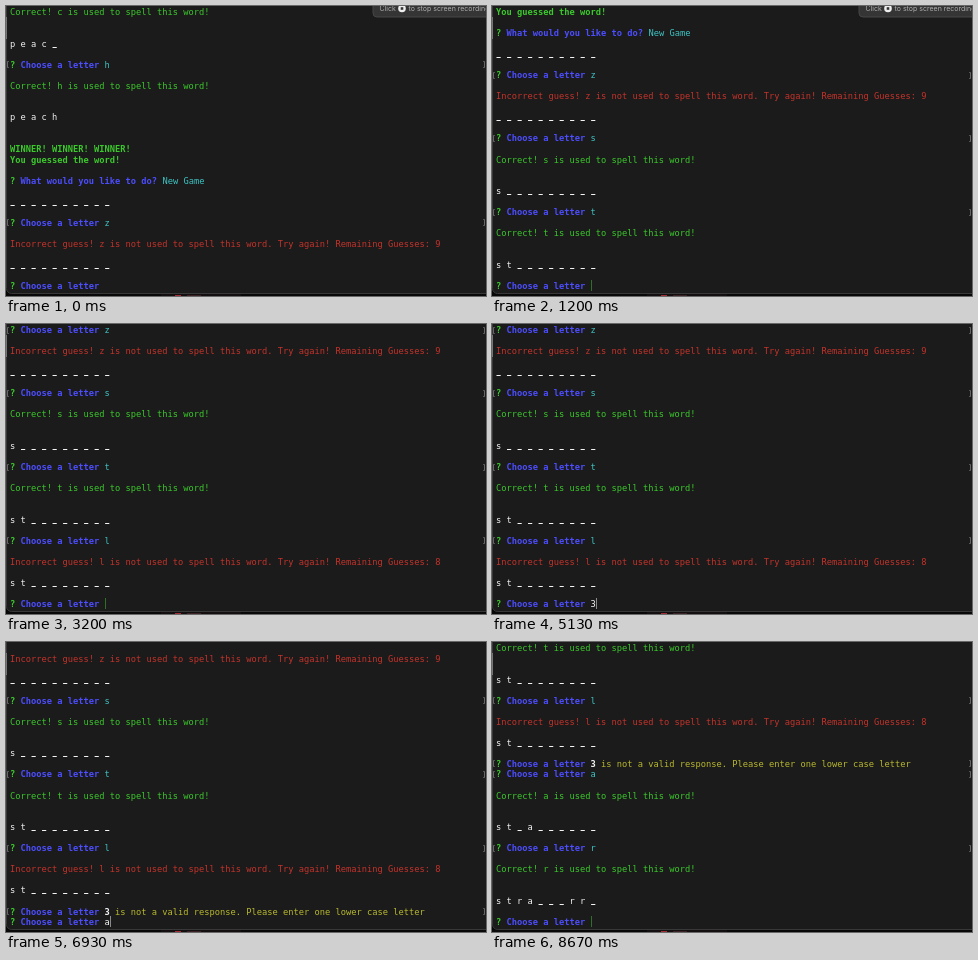
Write an HTML page with a canvas that moves like this. It is 480 px wide and 290 px high and loops after 9.54 s.

```html
<!DOCTYPE html>
<html lang="en">
<head>
<meta charset="utf-8">
<title>Word guessing game in a terminal</title>
<style>
  html, body { margin: 0; width: 100%; height: 100%; overflow: hidden; background: #080808; }
  canvas { display: block; }
</style>
</head>
<body>
<canvas id="stage" width="480" height="290"></canvas>
<script>
const ctx = document.getElementById('stage').getContext('2d');
const LOOP = 9540, PITCH = 10.54, CHAR = 5.256, LEFT = 4, BOTTOM_ROW = 26;
const GREEN = '#3cc92d', BLUE = '#4c4dff', CYAN = '#3fc4c4', RED = '#c5332b',
      YELLOW = '#b9b92f', WHITE = '#f4f4f4';

// The transcript: each row is a list of [column, text, color, bold] runs.
const rows = [];
const add = (runs, blanks = 1, marked = false) => {
  rows.push({ runs, marked });
  for (let i = 0; i < blanks; i++) rows.push({ runs: [] });
};
const prompt = [[0, '?', GREEN, true], [2, 'Choose a letter', BLUE, true]];
const ask = letter => add([...prompt, [18, letter, CYAN]], 1, true);
const word = (letters, blanks = 1) => add([[0, [...letters].join(' '), WHITE]], blanks);
const correct = letter => add([[0, `Correct! ${letter} is used to spell this word!`, GREEN]], 2);
const incorrect = (letter, left) => add([[0,
  `Incorrect guess! ${letter} is not used to spell this word. Try again! Remaining Guesses: ${left}`, RED]]);
const hit = (letter, result, blanks) => { ask(letter); correct(letter); word(result, blanks); };
const miss = (letter, left, result) => { ask(letter); incorrect(letter, left); word(result); };

correct('c');
word('peac_');
hit('h', 'peach', 2);
add([[0, 'WINNER! WINNER! WINNER!', GREEN, true]], 0);
add([[0, 'You guessed the word!', GREEN, true]]);
add([[0, '?', GREEN, true], [2, 'What would you like to do?', BLUE, true], [29, 'New Game', CYAN]]);
word('__________');
miss('z', 9, '__________');
hit('s', 's_________');
hit('t', 'st________');
miss('l', 8, 'st________');
add([...prompt, [18, '3', WHITE, true],
  [20, 'is not a valid response. Please enter one lower case letter', YELLOW]], 0, true);
hit('a', 'st_a______');
hit('r', 'stra___rr_');

// [start ms, active row, typed input (null: no prompt yet), cursor shown]
const steps = [
  [0, 26, '', false], [70, 26, 's', true],
  [330, 33, '', true], [1000, 33, 't', true],
  [1200, 40, '', true], [2600, 40, 'l', true],
  [3070, 46, '', true], [4600, 46, '', false], [5000, 46, '3', true],
  [5330, 47, null, true], [5600, 47, '', true], [6600, 47, 'a', true],
  [7070, 54, '', true], [7800, 54, 'r', true],
  [8270, 61, '', true]
];

function box(x, y, w, h, color) {
  ctx.fillStyle = color;
  ctx.fillRect(x, y, w, h);
}

function drawRuns(runs, line) {
  const baseline = 9 + line * PITCH;
  for (const [column, text, color, bold] of runs) {
    const x = LEFT + column * CHAR;
    ctx.font = `${bold ? 'bold ' : ''}8.73px "DejaVu Sans Mono", monospace`;
    ctx.fillStyle = color;
    ctx.fillText(text.replaceAll('_', ' '), x, baseline);
    // Underscores are short dashes just under the letters.
    [...text].forEach((char, i) => {
      if (char === '_') box(x + i * CHAR + 0.5, Math.round(baseline), 4.2, 1, color);
    });
  }
}

function drawMarks(line) {
  const y = Math.round(2.5 + line * PITCH);
  for (const [stem, tick] of [[1, 1], [478, 477]]) {
    box(stem, y, 1, 7, '#666');
    box(tick, y, 2, 1, '#555');
    box(tick, y + 6, 2, 1, '#555');
  }
}

function drawWindow() {
  box(0, 0, 480, 290, '#080808');
  ctx.beginPath();
  ctx.roundRect(0.5, -9.5, 490, 297, 5);
  ctx.fillStyle = '#1b1b1b';
  ctx.fill();
  ctx.strokeStyle = '#383838';
  ctx.lineWidth = 1;
  ctx.stroke();
  box(0, 11, 1, 22, '#777');
  box(155, 288, 80, 2, '#130f10');
  box(169, 289, 6, 1, '#a52d38');
  box(181, 289, 14, 1, '#3a2225');
}

function drawToast(t) {
  const p = Math.min(1, Math.max(0, (t - 2200) / 200));
  if (p === 1) return;
  ctx.save();
  ctx.translate(115 * p * p, 0);
  ctx.beginPath();
  ctx.roundRect(367, -10, 130, 21, 4);
  ctx.fillStyle = '#353535';
  ctx.fill();
  ctx.strokeStyle = '#464646';
  ctx.stroke();
  ctx.font = '7px Inter, sans-serif';
  ctx.fillStyle = '#b0b0b0';
  ctx.fillText('Click', 373.5, 4.5);
  ctx.fillText('to stop screen recording', 402.5, 4.5);
  ctx.beginPath();
  ctx.arc(396, 2.5, 3.8, 0, 7);
  ctx.fillStyle = '#eee';
  ctx.fill();
  box(394.7, 1.2, 2.6, 2.6, '#333');
  ctx.restore();
}

function draw(now) {
  const t = now % LOOP;
  const [, active, typed, cursor] = steps.findLast(step => step[0] <= t);
  const top = active - BOTTOM_ROW;
  drawWindow();
  for (let i = top; i < active; i++) {
    drawRuns(rows[i].runs, i - top);
    if (rows[i].marked) drawMarks(i - top);
  }
  if (typed !== null) drawRuns([...prompt, [18, typed, WHITE]], BOTTOM_ROW);
  if (cursor) {
    const column = typed === null ? 0 : 18 + typed.length;
    box(Math.round(LEFT + column * CHAR), 274, 1, 11, typed ? '#8a8a8a' : '#2f7029');
  }
  drawToast(t);
}

const start = performance.now();
function tick() {
  draw(performance.now() - start);
  requestAnimationFrame(tick);
}
tick();
</script>
</body>
</html>
```
